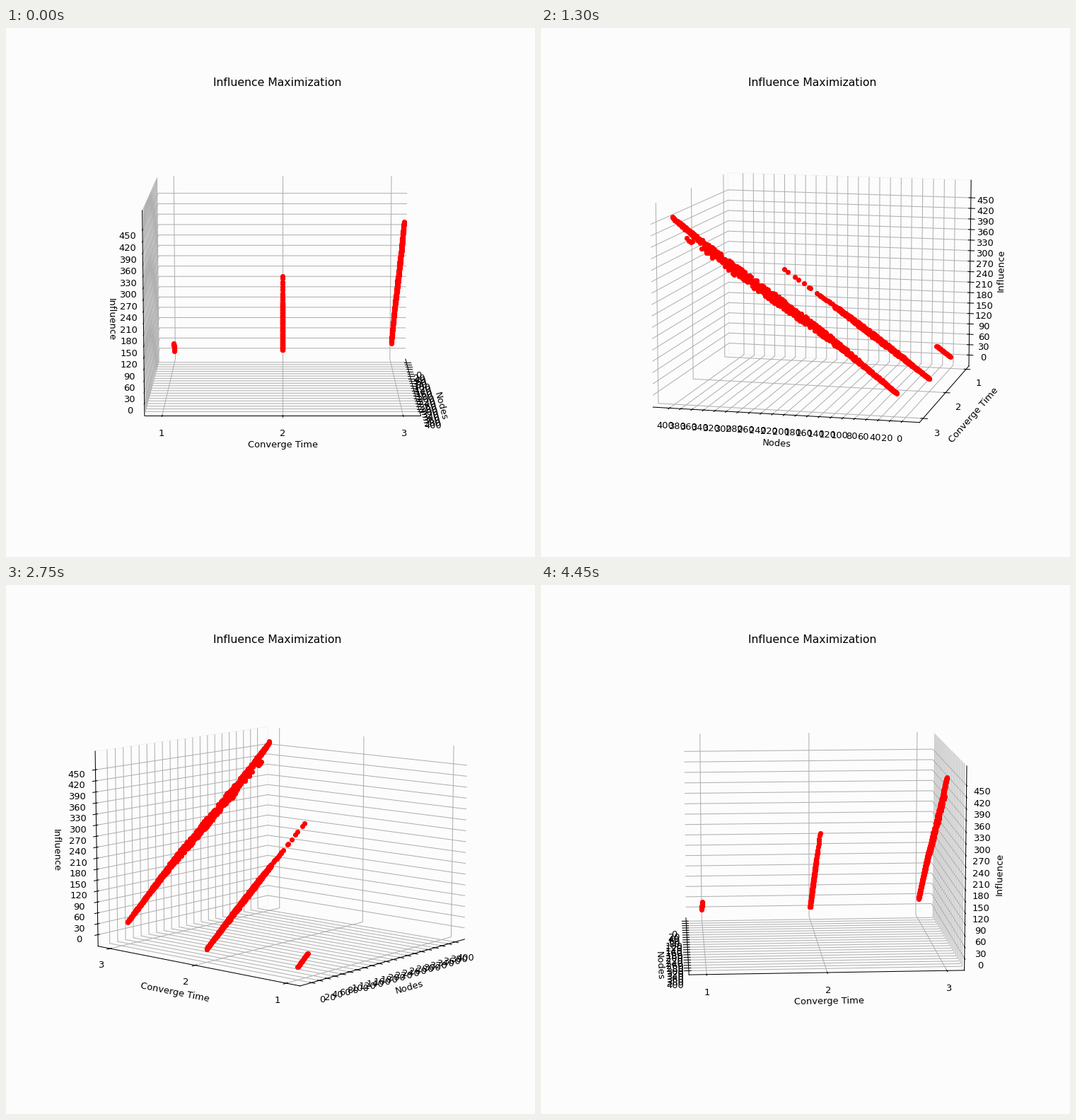
These frames come from a looping animation (748 by 748 pixels, 4500 ms). A matplotlib script:

```python
import matplotlib.pyplot as plt
import numpy as np
from matplotlib.animation import FuncAnimation

INCHES, DPI = 8, 93.5
FRAMES, INTERVAL = 90, 50
BACKGROUND = "#fcfcfc"
RED = "#ff0000"

rng = np.random.default_rng(4)


def padded(low, high):
    """Data range with the 5% margin plus the small 3D view margin."""
    low, high = low - 0.05 * (high - low), high + 0.05 * (high - low)
    edge = (high - low) / 48
    return low - edge, high + edge


def fast_group():
    nodes = np.arange(0, 27)
    return nodes, 1.5 + 1.13 * nodes


def medium_group():
    dense = np.repeat(np.arange(0, 170), 3)
    middle = rng.integers(165, 197, 14)
    sparse = [201, 213, 215, 225, 235, 241, 254, 260]
    nodes = np.concatenate([dense, middle, sparse])
    spread = 6 * np.sin(np.pi * np.clip(nodes / 200, 0, 1))
    noise = rng.uniform(-1, 1, nodes.size) * spread
    return nodes, 4 + 1.13 * nodes - 0.00018 * nodes**2 + noise


def slow_trend(nodes):
    t = (nodes - 16) / 384
    return 30 + 433 * t + 6 * np.sin(2 * np.pi * t)


def slow_group():
    nodes = np.repeat(np.arange(16, 401), 2)
    t = (nodes - 16) / 384
    spread = 1.5 + 11 * np.sin(np.pi * t**1.3)
    influence = slow_trend(nodes) + rng.uniform(-1, 1, nodes.size) * spread
    weak = rng.integers(270, 352, 16)
    weak_influence = slow_trend(weak) - rng.uniform(10, 18, weak.size)
    return (np.concatenate([nodes, weak, [366, 368, 372, 376]]),
            np.concatenate([influence, weak_influence, [403, 401, 404, 410]]))


fig = plt.figure(figsize=(INCHES, INCHES), dpi=DPI, facecolor=BACKGROUND)
ax = fig.add_subplot(projection="3d", facecolor=BACKGROUND)

for converge_time, group in enumerate((fast_group, medium_group, slow_group), 1):
    nodes, influence = group()
    ax.scatter(nodes, np.full(nodes.size, converge_time), influence,
               c=RED, s=20, depthshade=False)

ax.set_title("Influence Maximization")
ax.set_xlabel("Nodes")
ax.set_ylabel("Converge Time")
ax.set_zlabel("Influence")
ax.set_xticks(range(0, 401, 20))
ax.set_yticks([1, 2, 3])
ax.set_zticks(range(0, 451, 30))
ax.set_xlim(padded(0, 400))
ax.set_ylim(padded(1, 3))
ax.set_zlim(padded(2, 466))

for axis in (ax.xaxis, ax.yaxis, ax.zaxis):
    axis.pane.set_facecolor("none")
    axis.pane.set_edgecolor("none")
ax.yaxis.pane.set_edgecolor("#e8e8e8")
ax.yaxis.pane.set_linewidth(0.7)


def update(frame):
    ax.view_init(elev=10, azim=frame * 360 / FRAMES)
    return ()


anim = FuncAnimation(fig, update, frames=FRAMES, interval=INTERVAL,
                     init_func=lambda: update(0), repeat=True, repeat_delay=0)
plt.show()
```
